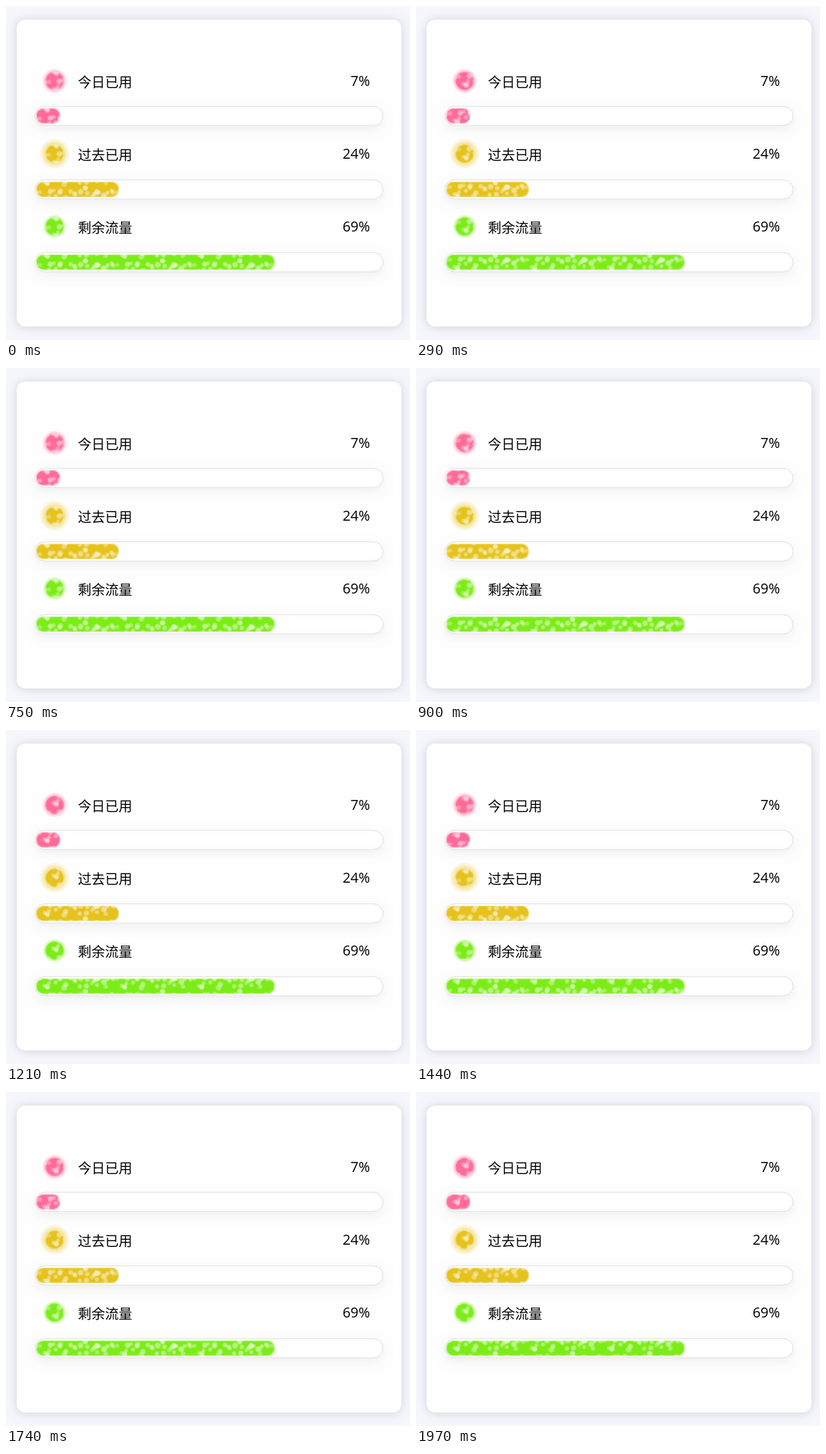
These frames come from a looping animation (565x468 px, 2.05 s). An HTML page with a canvas:

```html
<!DOCTYPE html>
<html lang="zh-CN">
<head>
<meta charset="utf-8">
<title>流量</title>
<style>
html, body { margin: 0; width: 100%; height: 100%; overflow: hidden; background: #f6f7fc; }
canvas { display: block; }
</style>
</head>
<body>
<canvas id="stage" width="565" height="468"></canvas>
<script>
const ctx = document.getElementById('stage').getContext('2d');
const LOOP = 2050, STEP = 75, STEPS = 27, PHASES = 10;
const ROW_GAP = 102, TRACK_W = 487;
const TILE_W = 108, TILE_H = 24;

const ROWS = [
  { label: '今日已用', pct: 7, rgb: '255,107,152', glow: 18 },
  { label: '过去已用', pct: 24, rgb: '230,194,28', glow: 22 },
  { label: '剩余流量', pct: 69, rgb: '124,236,24', glow: 17 }
];

function random(seed) {
  return () => (seed = (seed * 16807) % 2147483647) / 2147483647;
}

// two bright bubbles and two large ones lead a random crowd
function makeBubbles() {
  const rnd = random(2024);
  const list = [
    { x: 69, y: 9, r: 3.6, a: .65 }, { x: 85, y: 15, r: 4, a: .7 },
    { x: 20, y: 14, r: 3.8, a: .5 }, { x: 16, y: 2, r: 3.6, a: .5 }
  ];
  const count = 26;
  for (let i = 0; i < count; i++) {
    list.push({
      x: (i + rnd()) * TILE_W / count,
      y: 12 + 16 * rnd(),
      r: 2.4 + 1.8 * rnd(),
      a: .3 + .22 * rnd()
    });
  }
  return list;
}
const bubbles = makeBubbles();

function drawBubble(g, x, y, r, a) {
  const grad = g.createRadialGradient(x, y, 0, x, y, r + 1);
  grad.addColorStop(0, `rgba(255,255,255,${a})`);
  grad.addColorStop(.55, `rgba(255,255,255,${a * .9})`);
  grad.addColorStop(1, 'rgba(255,255,255,0)');
  g.fillStyle = grad;
  g.fillRect(x - r - 1, y - r - 1, 2 * r + 2, 2 * r + 2);
}

function makePattern(phase) {
  const tile = document.createElement('canvas');
  tile.width = TILE_W;
  tile.height = TILE_H;
  const g = tile.getContext('2d');
  for (const b of bubbles) {
    const y = (b.y + TILE_H * (1 - phase / PHASES)) % TILE_H;
    for (const dx of [-TILE_W, 0, TILE_W])
      for (const dy of [-TILE_H, 0, TILE_H]) drawBubble(g, b.x + dx, y + dy, b.r, b.a);
  }
  return ctx.createPattern(tile, 'repeat');
}
const patterns = Array.from({ length: PHASES }, (_, i) => makePattern(i));

function box(x, y, w, h, r) {
  ctx.beginPath();
  ctx.roundRect(x, y, w, h, r);
}

function shadow(color, blur, dy = 0) {
  ctx.shadowColor = color;
  ctx.shadowBlur = blur;
  ctx.shadowOffsetY = dy;
}

function fillBubbly(x, y, w, h, r, rgb, pattern) {
  ctx.save();
  ctx.translate(x, y);
  box(0, 0, w, h, r);
  ctx.fillStyle = `rgb(${rgb})`;
  ctx.fill();
  ctx.clip();
  ctx.fillStyle = pattern;
  ctx.fillRect(0, 0, w, h);
  // soft pale rim
  shadow('rgba(255,255,255,.6)', 3);
  ctx.strokeStyle = 'rgba(255,255,255,.45)';
  ctx.lineWidth = 2;
  ctx.stroke();
  ctx.restore();
}

function drawTrack(y) {
  ctx.save();
  box(40.5, y, TRACK_W, 27, 13.5);
  shadow('rgba(0,0,0,.06)', 14, 5);
  ctx.fillStyle = '#fff';
  ctx.fill();
  shadow('transparent', 0);
  ctx.save();
  ctx.clip();
  shadow('rgba(0,0,0,.1)', 4);
  ctx.strokeStyle = '#e6e6e8';
  ctx.stroke();
  ctx.restore();
  ctx.strokeStyle = '#e5e5e7';
  ctx.stroke();
  ctx.restore();
}

function drawGlow(x, y, r, rgb) {
  const g = ctx.createRadialGradient(x, y, 12, x, y, r);
  g.addColorStop(0, `rgba(${rgb},.5)`);
  g.addColorStop(.5, `rgba(${rgb},.24)`);
  g.addColorStop(1, `rgba(${rgb},0)`);
  ctx.fillStyle = g;
  ctx.beginPath();
  ctx.arc(x, y, r, 0, 2 * Math.PI);
  ctx.fill();
}

function drawText(text, x, y, align, font) {
  ctx.fillStyle = '#000';
  ctx.textAlign = align;
  ctx.font = font;
  ctx.fillText(text, x, y);
}

function drawRow(row, i, pattern) {
  const y = 105 + i * ROW_GAP;
  const trackY = 140.5 + Math.round(i * 102.6);
  drawTrack(trackY);
  fillBubbly(42, trackY + 2.5, (TRACK_W - 3) * row.pct / 100, 22, 10, row.rgb, pattern);
  drawGlow(68, y, row.glow, row.rgb);
  fillBubbly(54.5, y - 13.5, 27, 27, 13.5, row.rgb, pattern);
  drawText(row.label, 100.5, y + 9, 'left', '300 19px "Noto Sans CJK SC", "Noto Sans CJK", sans-serif');
  drawText(row.pct + '%', 509, y + 7, 'right', '19.5px "Open Sans", "Noto Sans", sans-serif');
}

function draw(phase) {
  ctx.fillStyle = '#f6f7fc';
  ctx.fillRect(0, 0, 565, 468);
  ctx.save();
  box(15, 19, 538, 430, 12);
  shadow('rgba(0,0,0,.15)', 14, 1);
  ctx.fillStyle = '#fefefe';
  ctx.fill();
  ctx.restore();
  ROWS.forEach((row, i) => drawRow(row, i, patterns[phase]));
}

const start = performance.now();
function tick() {
  const t = (performance.now() - start) % LOOP;
  const step = Math.min(STEPS - 1, Math.floor((t + 5) / STEP));
  draw(step % PHASES);
  requestAnimationFrame(tick);
}
tick();
</script>
</body>
</html>
```
